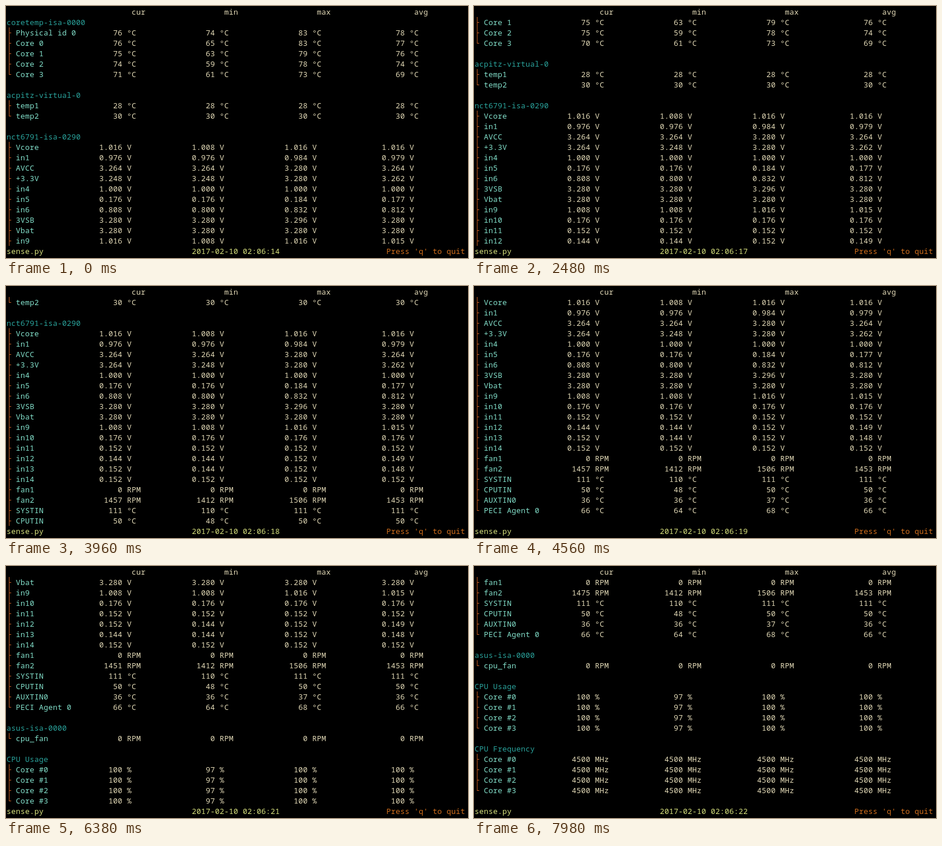
Write an HTML page with a canvas that moves like this. It is 798 by 436 pixels and loops after 8 s.

```html
<!DOCTYPE html>
<html lang="en">
<head>
<meta charset="utf-8">
<title>Sensor monitor</title>
<style>
  html, body { margin: 0; width: 100%; height: 100%; overflow: hidden; background: #000; }
  canvas { display: block; }
</style>
</head>
<body>
<canvas id="screen" width="798" height="436"></canvas>
<script>
const LOOP = 8000, CELL_W = 8, CELL_H = 18, PAD = 1, ASCENT = 14, VIEW_ROWS = 22;
const COLORS = {
  value: '#e2d9b6', heading: '#2aa39c', name: '#82dfca',
  tree: '#bf5a20', status: '#d8e27e', hint: '#d5701c'
};

// Each sensor: name | cur min max avg (one number stands for all four) | unit
const GROUPS = {
  'coretemp-isa-0000': [
    'Physical id 0|76 74 83 78|°C', 'Core 0|76 65 83 77|°C', 'Core 1|75 63 79 76|°C',
    'Core 2|74 59 78 74|°C', 'Core 3|71 61 73 69|°C'
  ],
  'acpitz-virtual-0': ['temp1|28|°C', 'temp2|30|°C'],
  'nct6791-isa-0290': [
    'Vcore|1.016 1.008 1.016 1.016|V', 'in1|0.976 0.976 0.984 0.979|V',
    'AVCC|3.264 3.264 3.280 3.264|V', '+3.3V|3.248 3.248 3.280 3.262|V',
    'in4|1.000|V', 'in5|0.176 0.176 0.184 0.177|V', 'in6|0.808 0.800 0.832 0.812|V',
    '3VSB|3.280 3.280 3.296 3.280|V', 'Vbat|3.280|V', 'in9|1.016 1.008 1.016 1.015|V',
    'in10|0.176|V', 'in11|0.152|V', 'in12|0.144 0.144 0.152 0.149|V',
    'in13|0.152 0.144 0.152 0.148|V', 'in14|0.152|V', 'fan1|0|RPM',
    'fan2|1457 1412 1506 1453|RPM', 'SYSTIN|111 110 111 111|°C',
    'CPUTIN|50 48 50 50|°C', 'AUXTIN0|36 36 37 36|°C', 'PECI Agent 0|66 64 68 66|°C'
  ],
  'asus-isa-0000': ['cpu_fan|0|RPM'],
  'CPU Usage': [0, 1, 2, 3].map(i => `Core #${i}|100 97 100 100|%`),
  'CPU Frequency': [0, 1, 2, 3].map(i => `Core #${i}|4500|MHz`)
};

// Refreshed "cur" readings by time
const UPDATES = [
  [1200, { 'Core 2': '75', 'Core 3': '70', '+3.3V': '3.264', in9: '1.008' }],
  [5200, { in5: '0.184', in12: '0.152', in13: '0.144', fan2: '1451' }],
  [7200, { fan2: '1475' }]
];

// Key presses: a hesitant start, then a steady rhythm
const SCROLLS = [700, 1300, 2150, 2550, 2860];
for (let i = 0; i < 22; i++) SCROLLS.push(3150 + i * 223);

const HEADERS = [[27, 'cur'], [47, 'min'], [67, 'max'], [88, 'avg']];
const UNIT_COLUMNS = [26, 46, 66, 87];

const lines = Object.entries(GROUPS).flatMap(([heading, sensors]) => [
  { heading },
  ...sensors.map((text, i) => {
    const [name, numbers, unit] = text.split('|');
    const list = numbers.split(' ');
    const values = UNIT_COLUMNS.map((_, k) => list[k] || list[0]);
    return { name, values, unit, last: i === sensors.length - 1 };
  }),
  {}
]);

const ctx = document.getElementById('screen').getContext('2d');
ctx.font = '13px "Noto Sans Mono", "DejaVu Sans Mono", monospace';
ctx.textAlign = 'center';

// One glyph per terminal cell
function write(text, col, row, color) {
  ctx.fillStyle = color;
  [...text].forEach((glyph, i) => {
    ctx.fillText(glyph, PAD + (col + i + 0.5) * CELL_W, PAD + row * CELL_H + ASCENT);
  });
}

function drawBranch(row, last) {
  const x = PAD + 4, y = PAD + row * CELL_H;
  ctx.fillStyle = COLORS.tree;
  ctx.fillRect(x, y, 1, last ? 10 : CELL_H);
  ctx.fillRect(x, y + 9, 4, 1);
}

function drawLine(line, row, readings) {
  if (line.heading) write(line.heading, 0, row, COLORS.heading);
  if (!line.name) return;
  drawBranch(row, line.last);
  write(line.name, 2, row, COLORS.name);
  line.values.forEach((value, i) => {
    const text = i === 0 && readings[line.name] || value;
    const col = UNIT_COLUMNS[i];
    write(text, col - 1 - text.length, row, COLORS.value);
    write(line.unit, col, row, COLORS.value);
  });
}

function draw(t) {
  ctx.fillStyle = '#000';
  ctx.fillRect(0, 0, 798, 436);
  HEADERS.forEach(([col, text]) => write(text, col, 0, COLORS.value));

  const offset = SCROLLS.filter(time => time <= t).length;
  const readings = Object.assign({}, ...UPDATES.filter(([time]) => time <= t).map(u => u[1]));
  lines.slice(offset, offset + VIEW_ROWS).forEach((line, i) => drawLine(line, i + 1, readings));

  const seconds = 14 + Math.floor((t + 800) / 1000);
  write('sense.py', 0, 23, COLORS.status);
  write(`2017-02-10 02:06:${seconds}`, 40, 23, COLORS.status);
  write("Press 'q' to quit", 82, 23, COLORS.hint);
}

const start = performance.now();
function tick() {
  draw((performance.now() - start) % LOOP);
  requestAnimationFrame(tick);
}
tick();
</script>
</body>
</html>
```
